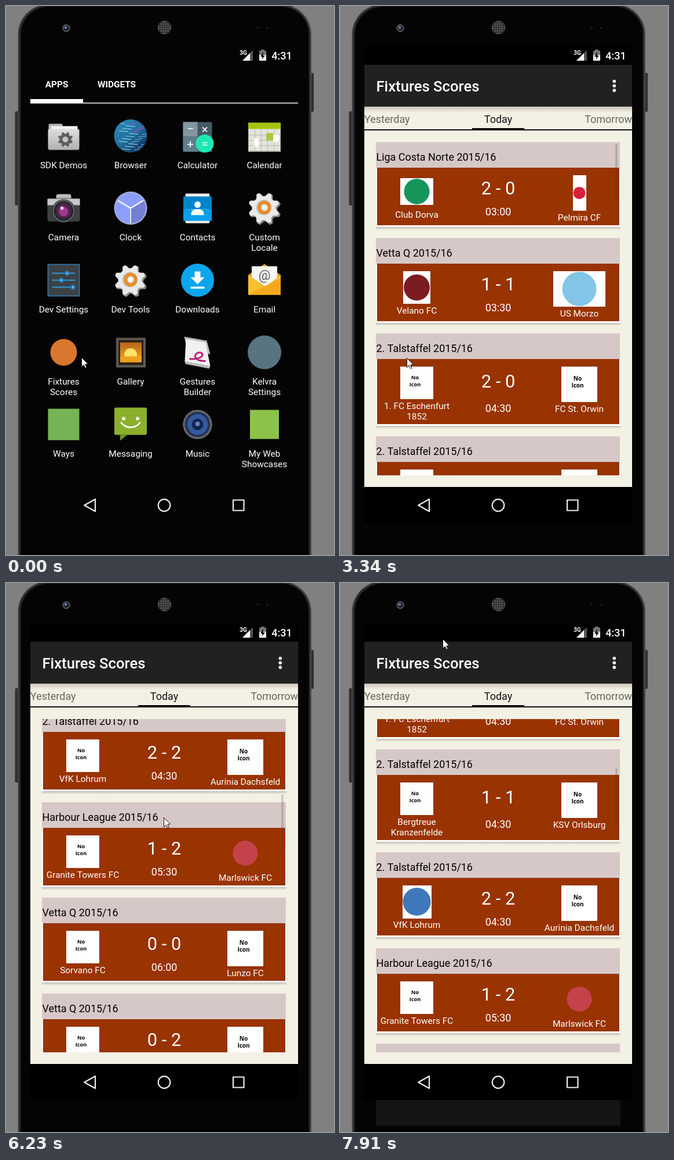
These frames come from a looping animation (566x944 px, 8 s). An HTML page with a canvas:

```html
<!DOCTYPE html>
<html lang="en">
<head>
<meta charset="utf-8">
<title>Match list</title>
<style>
html, body { margin: 0; width: 100%; height: 100%; overflow: hidden; background: #808080; }
canvas { display: block; }
</style>
</head>
<body>
<canvas id="stage" width="566" height="944"></canvas>
<script>
const g = document.getElementById('stage').getContext('2d');
const LOOP = 8000, TICK = 136, LEAD = 40; // the screen refreshes once per tick
const CREAM = '#f3f0e4', RUST = '#993300', BODY = '#040404', TAU = Math.PI * 2;
const clamp = v => Math.min(1, Math.max(0, v));

// Pointer strokes: first tick, last tick, end point
const strokes = [
  [1, 2, 115, 605], [27, 29, 219, 671], [29, 31, 225, 683], [33, 35, 288, 170],
  [37, 38, 283, 215], [38, 43, 259, 689], [44, 45, 276, 590], [45, 46, 272, 403],
  [46, 51, 279, 376], [53, 54, 243, 900], [54, 55, 228, 912], [57, 58, 177, 96]
];
function pointerAt(tick) {
  let x = 130, y = 604;
  for (const [from, to, endX, endY] of strokes) {
    const p = clamp((tick - from) / (to - from));
    x += (endX - x) * p;
    y += (endY - y) * p;
  }
  return [x, y];
}

// A fling slows down exponentially until it stops
function fling(t, start, length, distance) {
  const age = Math.min(Math.max(t - start, 0), length);
  return distance * (1 - Math.exp(-age / 190));
}
function scrollAt(t) {
  return fling(t, 4478, 1300, 550) + fling(t, 6097, 800, 334) - fling(t, 7400, 600, 469);
}

// league, score, time, home, away, home badge, away badge (width, height, colour, backing)
const matches = [
  ['Liga Costa Norte', '2 - 0', '03:00', ['Club Dorva'], 'Pelmira CF', [57, 46, '#16955a', '#fff'], [23, 61, '#d8203c', '#fff']],
  ['Vetta Q', '1 - 1', '03:30', ['Velano FC'], 'US Morzo', [47, 56, '#7a1c22', '#fff'], [90, 61, '#83c5e6', '#fff']],
  ['2. Talstaffel', '2 - 0', '04:30', ['1. FC Eschenfurt', '1852'], 'FC St. Orwin'],
  ['2. Talstaffel', '1 - 1', '04:30', ['Bergtreue', 'Kranzenfelde'], 'KSV Orlsburg'],
  ['2. Talstaffel', '2 - 2', '04:30', ['VfK Lohrum'], 'Aurinia Dachsfeld'],
  ['Harbour League', '1 - 2', '05:30', ['Granite Towers FC'], 'Marlswick FC', , [45, 61, '#c4434b']],
  ['Vetta Q', '0 - 0', '06:00', ['Sorvano FC'], 'Lunzo FC'],
  ['Vetta Q', '0 - 2', '06:00', ['Cadmaria BC'], 'Vigorosa Belmo'],
  ['Vetta Q', '2 - 0', '06:00', ['Trevalia FC'], 'Ostrana', , [62, 61, '#1c1a18', '#fff']]
];
const lateBadge = [50, 57, '#3f78bb', '#fff'];

function rect(x, y, w, h, color) { g.fillStyle = color; g.fillRect(x, y, w, h); }
function disc(x, y, r, color) { g.fillStyle = color; g.beginPath(); g.arc(x, y, r, 0, TAU); g.fill(); }
function arc(x, y, r, w, color, from = 0, to = TAU) {
  g.strokeStyle = color; g.lineWidth = w; g.beginPath(); g.arc(x, y, r, from, to); g.stroke();
}
function round(x, y, w, h, r, color) { g.fillStyle = color; g.beginPath(); g.roundRect(x, y, w, h, r); g.fill(); }
function trace(points, close) {
  g.beginPath();
  for (let i = 0; i < points.length; i += 2) g.lineTo(points[i], points[i + 1]);
  if (close) g.closePath();
}
function poly(points, color) { trace(points, true); g.fillStyle = color; g.fill(); }
function line(points, w, color) { trace(points); g.lineWidth = w; g.strokeStyle = color; g.stroke(); }
function text(s, x, y, size, color = '#fff', align = 'center', weight = 400, family = 'Roboto') {
  g.font = `${weight} ${size}px ${family}, sans-serif`;
  g.textAlign = align; g.fillStyle = color; g.fillText(s, x, y);
}
function fade(x0, y0, x1, y1, ...colors) {
  const f = g.createLinearGradient(x0, y0, x1, y1);
  colors.forEach((c, i) => f.addColorStop(i / (colors.length - 1), c));
  return f;
}
function gear(x, y, r, color) {
  const p = [];
  for (let i = 0; i < 32; i++) {
    const a = (i + .5) / 32 * TAU + .2, d = i % 4 < 2 ? r : r * .76;
    p.push(x + d * Math.cos(a), y + d * Math.sin(a));
  }
  poly(p, color);
}
function toolGear() {
  gear(1, 2, 28, '#8d8d8d');
  gear(-1, 0, 27, '#e9e9e9');
  disc(-1, -1, 13, '#b9b9b9');
  arc(0, -1, 9, 5, '#f08a1c');
  disc(0, -1, 5, '#fff');
}

// Each icon is drawn around its own centre
const apps = [
  ['SDK Demos', () => {
    round(-26, -21, 24, 14, 2, '#b5b5b5'); rect(-22, -17, 46, 10, '#f2f2f2');
    round(-27, -12, 54, 36, 3, fade(0, -12, 0, 24, '#dedede', '#b0b0b0'));
    gear(3, 6, 13, '#5b5d60'); disc(3, 6, 5, '#c4c4c4');
  }],
  ['Browser', () => {
    disc(0, 0, 28.5, fade(-20, -25, 20, 25, '#2c86b5', '#1f6f9c', '#122d5c'));
    g.save(); g.beginPath(); g.arc(0, 0, 28, 0, TAU); g.clip();
    for (let i = 0; i < 11; i++) {
      const y = -22 + i * 4.4, x = i * 17 % 23 - 25;
      line([x, y, x + 16, y + 1.5], 1.2, '#8fd0e8');
      line([x + 22, y + 2, x + 36, y], 1, i < 4 ? '#b54fd0' : '#6ec0e2');
    }
    g.restore();
  }],
  ['Calculator', () => {
    round(-25, -24, 50, 51, 3, '#455a64');
    rect(-25, -24, 25, 25, '#8496a0'); rect(-25, 1, 25, 26, '#607d8b'); rect(0, 1, 25, 26, '#546e7a');
    text('−', -12.5, -6, 21); text('×', 12.5, -5, 21); text('+', -12.5, 20, 21);
    disc(12.5, 13, 15.5, '#1de9b6');
    text('=', 12.5, 20, 21);
  }],
  ['Calendar', () => {
    rect(-28, -22, 56, 49, '#e4e4dc'); rect(-28, -23, 56, 11, '#a4c411');
    for (let i = 0; i < 6; i++) rect(-28 + i * 11, -10, 1, 36, '#b8b8b0');
    for (let i = 0; i < 4; i++) rect(-28, -2 + i * 9, 56, 1, '#b8b8b0');
    rect(-18, 4, 8, 14, '#fff'); rect(15, -2, 10, 12, '#fff'); rect(3, -5, 12, 13, '#a9ca3a');
  }],
  ['Camera', () => {
    round(-13, -24, 26, 12, 4, '#bdbdbd');
    round(-28, -17, 56, 40, 4, '#3f4143'); rect(-28, -16, 56, 11, '#c8c8c8');
    disc(0, 5, 20, '#26282a'); arc(0, 5, 18, 2, '#66686a');
    disc(0, 5, 13, '#54204f'); disc(0, 6, 8, '#a03b92'); disc(-3, 0, 3, '#e6c4e2');
  }],
  ['Clock', () => {
    disc(0, 0, 28.5, '#a3abd8'); disc(0, 0, 26, '#8c9eff');
    g.fillStyle = '#747fd6'; g.beginPath(); g.moveTo(0, 0); g.arc(0, 0, 26, -.52, 1.57); g.fill();
    line([-22, -13, 0, 0, 22, -13], 2.5, '#f5f5ff'); line([0, 0, 0, 26], 2, '#dfe3ff');
  }],
  ['Contacts', () => {
    round(-21, -25, 42, 51, 2, '#eee');
    rect(-24.5, -20, 49, 22, '#0284c8'); rect(-24.5, 2, 49, 20, '#0a9fe8');
    disc(0, -6, 5.5, '#fff'); round(-11, 2, 22, 10, [8, 8, 0, 0], '#fff');
  }],
  ['Custom|Locale', toolGear],
  ['Dev Settings', () => {
    rect(-28, -28, 56, 56, '#2f6f9e'); rect(-26, -26, 52, 52, '#3c4145');
    for (let i = -1; i < 2; i++) {
      const x = i ? 11 + i * 5 : -4, y = i * 12;
      line([-20, y, 20, y], 2, '#2f9be0'); disc(x, y, 4.5, '#2874a8'); disc(x, y, 2, '#63b9ef');
    }
  }],
  ['Dev Tools', toolGear],
  ['Downloads', () => {
    disc(0, 0, 28.5, '#0ca6ee');
    rect(-5, -15, 10, 11, '#fff'); poly([12, -5, 0, 7, -12, -5], '#fff'); rect(-12, 11, 24, 3.5, '#fff');
  }],
  ['Email', () => {
    poly([-28, -9, 0, -28, 28, -9, 28, 25, -28, 25], '#e8a018');
    rect(-22, -24, 44, 35, '#f6f6f6'); text('@', 0, -1, 23, '#606060');
    poly([-28, -9, 2, 11, 28, -9, 28, 25, -28, 25], '#fbc02d');
    poly([-28, 25, 28, -4, 28, 25], '#f2a91d');
  }],
  ['Fixtures|Scores', () => disc(0, 0, 23, '#d9772f')],
  ['Gallery', () => {
    rect(-25, -25, 51, 51, '#5d5a54'); rect(-21, -21, 43, 43, '#2b2117');
    rect(-18, -17, 37, 34, fade(0, -17, 0, 17, '#b8651a', '#f6a821'));
    disc(0, 4, 11, '#ffe268'); rect(-18, 7, 37, 10, '#eda022');
  }],
  ['Gestures|Builder', () => {
    poly([-23, -27, 16, -20, 22, 3, -16, 2], '#b9b9b9');
    poly([-20, -23, 14, -17, 22, 24, -22, 16], '#f1f1f1'); poly([-22, 16, 22, 24, 20, 28, -21, 20], '#bdbdbd');
    g.strokeStyle = '#bd1f7d'; g.lineWidth = 3; g.beginPath(); g.moveTo(-14, 11);
    g.bezierCurveTo(-4, 13, 12, 9, 8, 2); g.bezierCurveTo(3, -3, -9, 4, -2, 11);
    g.bezierCurveTo(4, 16, 8, 14, 14, 15); g.stroke();
  }],
  ['Kelvra|Settings', () => disc(0, 0, 29, '#587480')],
  ['Ways', () => rect(-27, -27, 54, 54, '#74b454')],
  ['Messaging', () => {
    round(-28, -29, 56, 47, 3, '#8bb02c'); poly([-18, 18, -18, 28, -6, 18], '#6f9320');
    disc(-12, -10, 3, '#fff'); disc(12, -10, 3, '#fff');
    arc(0, -15.5, 20.5, 2.6, '#fff', .6, Math.PI - .6);
  }],
  ['Music', () => {
    disc(0, 0, 25.5, '#3b3f46'); arc(0, 0, 23.5, 2, '#70757d'); disc(0, 0, 20, '#182a56');
    arc(0, 0, 14, 8, '#345a9f'); disc(0, 0, 8, '#13224c'); disc(0, -1, 4, '#5d86c8');
  }],
  ['My Web|Showcases', () => rect(-25, -25, 50, 50, '#8bc34a')]
];

function phone() {
  rect(0, 0, 566, 944, '#808080');
  round(15.5, 181, 8, 162, 2, '#303030'); round(523, 115, 8, 67, 2, '#303030');
  round(20.5, -3, 506.5, 1000, 52, '#4c4c4c');
  round(22, -2, 503, 1000, 51, '#282828');
  round(25.5, 1, 497, 1000, 48, BODY);
  disc(104, 38, 6.5, '#6b6b6b'); disc(104, 38, 5, '#1d1d26'); disc(103, 37, 2.4, '#6a78b4');
  disc(273.5, 37, 12, '#2c2c2c');
  for (let y = -10; y <= 10; y += 4)
    for (let x = -10; x <= 10; x += 4)
      if (x * x + y * y < 135) disc(273.5 + x, 37 + y, 1.3, '#6a6a6a');
  rect(433, 36, 3, 2, '#2e2e2e'); rect(450, 36, 2, 3, '#2e2e2e');
}

function systemBars() {
  text('3G', 409.5, 84, 10, '#fff', 'center', 700);
  poly([426, 76, 426, 94, 408, 94], '#555'); poly([421, 81, 421, 94, 408, 94], '#fff');
  rect(440, 75, 6, 3, '#777'); rect(437, 77, 12, 7, '#777'); rect(437, 84, 12, 10, '#fff');
  poly([444, 79, 439, 87, 442.5, 87, 441.5, 92, 447, 85, 443.5, 85], '#000');
  text('4:31', 476, 92, 18, '#fff', 'center', 500);
  g.lineJoin = 'round';
  trace([135.2, 858.5, 154, 848, 154, 869], true); g.lineWidth = 2.2; g.strokeStyle = '#eee'; g.stroke();
  arc(273, 858.5, 10.3, 2.2, '#eee');
  g.strokeRect(392, 849.5, 18.5, 18);
  g.lineJoin = 'miter';
}

function launcher(pressed) {
  text('APPS', 87.5, 140, 15.4, '#fff', 'center', 700);
  text('WIDGETS', 191, 140, 15.4, '#fff', 'center', 700);
  rect(42, 166, 462, 1.7, '#ddd'); rect(42, 160, 91, 7, '#fff');
  apps.forEach(([name, draw], i) => {
    const x = 99.5 + i % 4 * 115.5, row = Math.floor(i / 4) * 124;
    g.save();
    if (pressed && i === 12) g.globalAlpha = .7;
    name.split('|').forEach((s, k) => text(s, x, 279 + row + k * 17.7, 15.4));
    g.translate(x, 223.5 + row);
    draw();
    g.restore();
  });
}

function appBar() {
  rect(42, 173, 462, 10, fade(0, 173, 0, 183, 'rgba(80,50,50,.24)', 'rgba(80,50,50,0)'));
  rect(42, 101, 462, 72, '#212121');
  text('Fixtures Scores', 62.5, 147, 25.66, '#fff', 'left', 500);
  for (let i = 0; i < 3; i++) disc(473.3, 129.5 + i * 7.8, 2.8, '#fff');
  text('Yesterday', 42, 201, 17.96, '#67655f', 'left');
  text('Today', 273, 201, 17.96, '#111');
  text('Tomorrow', 504, 201, 17.96, '#67655f', 'right');
  rect(42, 212, 462, 2, '#111'); rect(228, 210, 90, 3, '#000');
}

function badge(x, y, w, h, mark) {
  const midX = x + w / 2, midY = y + h / 2;
  if (mark) {
    const [mw, mh, color, back] = mark;
    if (back) rect(Math.round(midX - mw / 2), Math.round(midY - mh / 2), mw, mh, back);
    disc(midX, midY, Math.min(mw, mh) / 2 - 1, color);
    return;
  }
  rect(x, y, w, h, '#fff');
  const k = w / 57;
  ['No', 'Icon'].forEach((s, i) =>
    text(s, midX - 3, midY + (i * 11.5 - 6) * k, 9.2 * k, '#000', 'center', 700, '"Open Sans"'));
}

function card(m, y, mark) {
  const [league, score, time, home, away, homeMark, awayMark] = m;
  const two = home.length > 1, end = y + (two ? 156 : 143);
  rect(62, end + 3, 422, 5, fade(0, end + 3, 0, end + 8, '#c3bcb3', CREAM));
  rect(62, y + 44, 422, end - y - 41, '#fff');
  rect(62, y, 421, 44, '#d7c8c8');
  rect(64, y + 44, 418, end - y - 44, RUST);
  text(league + ' 2015/16', 62.5, y + 32, 17.96, '#000', 'left');
  text(score, 273, y + (two ? 93 : 90), 30.8);
  text(time, 273, y + (two ? 135 : 126), 17.96);
  badge(104, y + 57, 57, 56, mark || homeMark);
  badge(382, y + 57, 62, 61, awayMark);
  home.forEach((s, i) => text(s, 132.5, y + 130 + i * 17.7, 15.4));
  text(away, 413, y + 135, 15.4);
}

function list(t, scroll) {
  g.save();
  g.beginPath(); g.rect(62, 234, 422, 573); g.clip();
  let y = 234 - scroll;
  matches.forEach((m, i) => {
    if (y < 807 && y > 40) card(m, Math.round(y), t >= 7490 && i === 4 && lateBadge);
    y += m[3].length > 1 ? 177 : 164.5;
  });
  const idle = t >= 3620 && t < 4584 || t >= 7330 && t < 7440;
  if (!idle) rect(475, 237 + scroll * .18, 4, 97, 'rgba(60,50,50,.2)');
  g.restore();
}

function app(t, now) {
  const open = clamp((now - 1200) / 340);
  g.save();
  g.beginPath(); g.rect(42, 69, 462, 820); g.clip();
  g.globalAlpha = open;
  rect(42, 69, 462, 820, '#000');
  g.translate(0, 40 * (1 - open) ** 2);
  rect(42, 101, 462, 726, CREAM);
  g.restore();
  if (t < 2110) return;
  g.save();
  if (t < 2250) {
    g.globalAlpha = .83;
    text('There are no matches scheduled today.', 62.5, 259, 23, '#66645f', 'left');
  }
  appBar();
  g.restore();
  if (t >= 2250) list(t, scrollAt(now));
}

function pointer(x, y) {
  g.save();
  g.translate(Math.round(x) + .5, Math.round(y) + .5);
  trace([0, 0, 0, 16, 3.7, 12.6, 6.2, 18, 8.6, 17, 6.2, 11.6, 11, 11.2], true);
  g.fillStyle = '#fff'; g.fill();
  g.lineWidth = 1; g.strokeStyle = '#111'; g.stroke();
  g.restore();
}

const start = performance.now();
function frame() {
  const t = (performance.now() - start) % LOOP;
  const tick = Math.floor((t + LEAD) / TICK), now = tick * TICK - LEAD;
  phone();
  if (t >= 7490) rect(62, 889, 422, 44, '#141414');
  if (t < 1540) launcher(t >= 740);
  if (t >= 1270) app(t, now);
  systemBars();
  pointer(...pointerAt(tick));
  requestAnimationFrame(frame);
}
frame();
</script>
</body>
</html>
```
